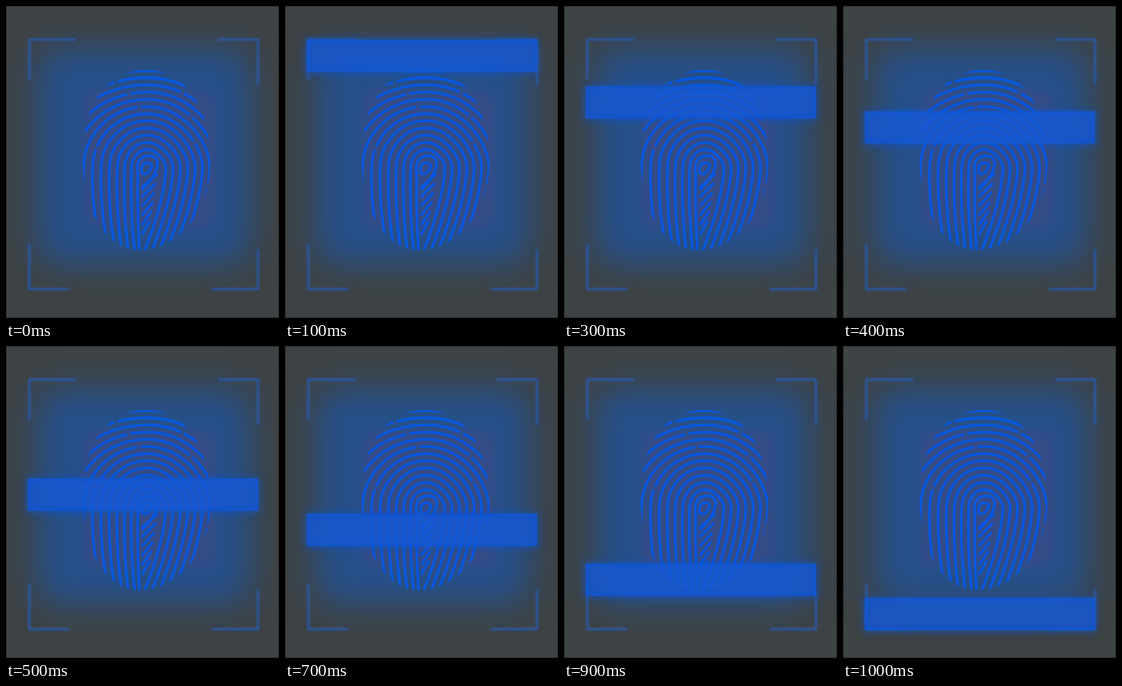
These frames come from a looping animation (350x400 px, 1.1 s). An HTML page:

```html
<!DOCTYPE html>
<html lang="en">
<head>
<meta charset="utf-8">
<title>Fingerprint scan</title>
<style>
html, body { margin: 0; width: 100%; height: 100%; overflow: hidden; background: #3e4345; }
#stage { position: relative; width: 350px; height: 400px; overflow: hidden; background: #3e4345; }
#stage > * { position: absolute; }
#halo { left: 40px; top: 55px; width: 273px; height: 276px; border-radius: 24px; background: #25508b; filter: blur(22px); }
#core { left: 100px; top: 108px; width: 170px; height: 176px; border-radius: 16px; background: #414a85; opacity: .6; filter: blur(8px); }
#bar { left: 28px; top: 0; width: 295px; height: 41px; box-sizing: border-box; background: rgba(22, 90, 214, .82);
  border: 1px solid rgba(14, 91, 220, .6); opacity: 0;
  box-shadow: 0 1px 9px 1px rgba(14, 86, 210, .75), inset 0 0 8px rgba(8, 84, 216, .8); }
#edge { inset: 0; box-shadow: inset 0 0 0 1px #2d3031; }
svg { left: 0; top: 0; fill: none; stroke-linecap: round; stroke-linejoin: round; }
#frame { stroke: #2a58a4; stroke-width: 3; filter: blur(.8px); }
#print { stroke: #0758e2; stroke-width: 3.3; }
</style>
</head>
<body>
<div id="stage">
  <div id="halo"></div>
  <div id="core"></div>
  <svg width="350" height="400">
    <clipPath id="outline"><path d="M98 192C98 126 130 82 180 82S262 130 262 200S215 313 172 313S98 265 98 192Z"/></clipPath>
    <path id="frame" d="M30 93V43H89M273 43H323V100M30 306V363H80M265 363H323V313"/>
    <g id="print" clip-path="url(#outline)"></g>
  </svg>
  <div id="bar"></div>
  <div id="edge"></div>
</div>
<script>
const print = document.getElementById("print");

function ridge(d, gap = 0) {
  const path = document.createElementNS("http://www.w3.org/2000/svg", "path");
  path.setAttribute("d", d);
  if (gap) {
    path.setAttribute("stroke-dasharray", "150 7");
    path.setAttribute("stroke-dashoffset", gap);
  }
  print.append(path);
}

// Nested arches, flatter on the left; the right legs sweep in towards the foot.
const cx = 181, shoulder = 208, foot = 313;
for (let i = 0; i < 12; i++) {
  const top = 184 - 9.2 * i, h = (shoulder - top) * .56;
  const left = 161 - 8.6 * i - .28 * i * i, right = 205 + 9.4 * i;
  const l = (cx - left) * .55, r = (right - cx) * .55;
  ridge(`M${165 - 8.4 * i} ${foot}Q${left - 2} 260 ${left} ${shoulder}` +
    `C${left} ${shoulder - h} ${cx - l} ${top} ${cx} ${top}` +
    `S${right} ${shoulder - r * .8} ${right} ${shoulder}` +
    `Q${right - 2} 250 ${right - 27} ${foot}`, i > 4 ? i * 67 : 0);
}

// Inner loop and the short ridges under it.
ridge("M171 312Q168 264 169 215Q165 193 184 192Q198 193 193 209Q188 223 175 235");
ridge("M174 214Q172 201 182 201Q191 203 184 211Q180 218 174 214Z");
for (let y = 226; y < 295; y += 12) {
  ridge(`M175 ${y + 6}L${193 - (y - 226) * .15} ${y - 10}`);
}

// Each segment moves in 100 ms steps: [time, bar top].
const loop = 1100;
const stops = [[0, 43], [100, 43], [200, 71], [400, 135], [500, 170], [700, 215], [900, 279], [1000, 323], [loop, 43]];
const keys = stops.map(([time, y], i) => ({
  offset: time / loop,
  transform: `translateY(${y}px)`,
  opacity: time % loop ? 1 : 0,
  easing: i < stops.length - 1 ? `steps(${(stops[i + 1][0] - time) / 100}, end)` : "linear"
}));
document.getElementById("bar").animate(keys, { duration: loop, iterations: Infinity });
</script>
</body>
</html>
```
